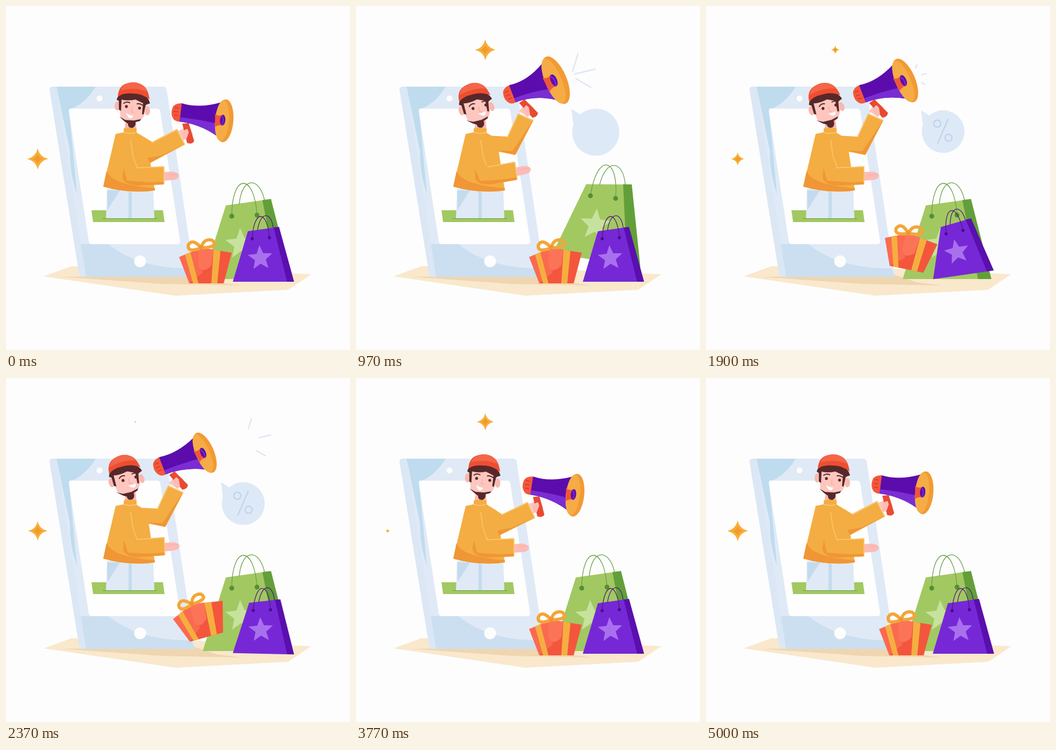
Animation of 640 by 640 pixels, one loop 5030 ms. Source, as an HTML page:

```html
<!DOCTYPE html>
<html lang="en">
<head>
<meta charset="utf-8">
<title>Shopping announcement</title>
<style>
html, body { margin: 0; width: 100%; height: 100%; overflow: hidden; background: #fdfdfd; }
svg { display: block; width: 100vw; height: 100vh; }
.line { fill: none; stroke-linecap: round; }
</style>
</head>
<body>
<svg viewBox="0 0 640 640">
  <defs>
    <g id="spark">
      <path d="M0-20Q3-4 20 0Q4 3 0 20Q-3 4-20 0Q-4-3 0-20Z" fill="#f8ae38"/>
      <path d="M0-10Q2-2 10 0Q2 2 0 10Q-2 2-10 0Q-2-2 0-10Z" fill="#f09a30"/>
    </g>
    <clipPath id="phoneClip"><path d="M88 150H292Q298 150 299 156L351 504H145Q137 504 136 498L81 157Q80 150 88 150Z"/></clipPath>
  </defs>

  <path d="M70 503L122 484L330 488L568 499L525 528L315 539Z" fill="#f9e8cc"/>
  <path d="M104 504L350 500L392 514L440 520L290 517Z" fill="#efd5b0"/>

  <!-- phone -->
  <g clip-path="url(#phoneClip)">
    <path d="M75 145H360V510H75Z" fill="#e0eaf6"/>
    <path d="M94 150H167Q150 178 125 190L117 191L132 350Q118 310 119 270Z" fill="#bfdcef"/>
    <path d="M133 443H190Q250 490 345 488L352 504H148Z" fill="#cbdff0"/>
    <path d="M81 150H94L149 504H136Z" fill="#dbe7f4"/>
  </g>
  <path d="M122 191H281Q286 191 287 196L324 438Q324 443 319 443H160Q155 443 154 438L117 196Q117 191 122 191Z" fill="#fefefe"/>
  <circle cx="174" cy="172" r="5.5" fill="#fdfdfd"/>
  <circle cx="249.500" cy="475" r="11" fill="#fdfdfd"/>

  <!-- body -->
  <path d="M159 380H292L295 402H162Z" fill="#a2c862"/>
  <path d="M188 340H274L276 395H186Z" fill="#dfeaf6"/>
  <path d="M188 343H212L189 379ZM228 346H234V395H228Z" fill="#c4dbed"/>
  <path d="M180 395.500H281" stroke="#659c3c"/>
  <path d="M223 211H241L243 232H220Z" fill="#f9b8ae"/>
  <path d="M204 238L219 235V228Q231 224 243 228V236L262 247L270 300L277 343Q229 350 181 336Z" fill="#f4ad42"/>
  <path d="M187 307Q197 333 277 339V343Q229 350 181 336Z" fill="#f09636"/>
  <path d="M219 235Q231 239 243 235" class="line" stroke="#f9cb7c" stroke-width="1.500"/>
  <path d="M232 250L236 278L244 301" class="line" stroke="#f8c266" stroke-width="2"/>

  <g id="forearm">
    <path d="M294 309L310 308Q321 310 322 316Q320 324 308 324L293 325Z" fill="#fcbcb6"/>
    <path d="M302 314L319 313" stroke="#f8a8a4"/>
    <path d="M222 272L243 301L294 298V332L242 334Q218 332 218 318Z" fill="#f4ad42"/>
    <path d="M219 301L225 325L266 328L293 327V332L242 334Q217 331 217 317Z" fill="#f09636"/>
    <path d="M243 301L294 299V331" class="line" stroke="#f9cb7c" stroke-width="1.500"/>
  </g>

  <g id="head">
    <ellipse cx="207" cy="186" rx="5" ry="8.500" fill="#f9b8ae"/>
    <ellipse cx="263" cy="195" rx="5" ry="8.500" fill="#f9b8ae"/>
    <path d="M211 206L223 211L254 207L249 214L241 216Q242 224 235 227Q226 226 227 219L221 215Z" fill="#57282a"/>
    <path d="M210 170L264 176L257 204L253 210L238 213L222 212L213 207Z" fill="#fdc6be"/>
    <path d="M206 174Q209 160 237 160Q263 162 268 181L260 184L256 202L253 201L255 181Q247 177 241 174Q226 177 215 174L214 195L210 193V177Z" fill="#57282a"/>
    <g id="face">
      <circle cx="224" cy="187" r="2.700" fill="#57282a"/>
      <circle cx="248.500" cy="190" r="2.700" fill="#57282a"/>
      <path d="M219 181Q224 177 230 180M244 182Q249 181 255 185" class="line" stroke="#57282a" stroke-width="2"/>
      <path d="M235 188L233 197L238 198" class="line" stroke="#f6a298"/>
    </g>
    <path id="mouth" d="M224 199Q230 204 237 204Q235 210 230 209Q225 206 224 199Z" fill="#fefefe"/>
    <path d="M208 169Q209 142 238 142Q264 144 267 174Q253 163 237 163Q218 161 208 169Z" fill="#ee4e30"/>
    <path d="M213 157Q219 142 238 142Q258 144 264 160Q240 150 213 157Z" fill="#f4664a"/>
  </g>

  <polygon id="arm" fill="#f4ad42" stroke="#f4ad42" stroke-width="2" stroke-linejoin="round"/>
  <polygon id="armShade" fill="#f09636"/>
  <polyline id="armEdge" class="line" stroke="#f9cb7c" stroke-width="1.500"/>

  <g id="horn">
    <path d="M320 232Q329 230 335 224L342 226L348 239L342 246L330 249Z" fill="#fdc6be"/>
    <path d="M328 219L340 218L350 251Q349 255 343 256L337 255Z" fill="#e94a32"/>
    <path d="M328 234Q333 229 338 229L340 235L336 247L329 249Z" fill="#fcbcb6"/>
    <path d="M327 181Q313 181 310 189Q305 202 312 211Q317 216 326 215Z" fill="#f4573c"/>
    <path d="M314 189L321 190M312 196L320 197M313 203L320 204" stroke="#c9382c" stroke-width="1.500"/>
    <path id="cone" fill="#5c0cac"/>
    <path id="coneShade" fill="#7a2dd2"/>
    <g id="bell">
      <ellipse cx="1" rx="17" ry="40" fill="#f29a34"/>
      <ellipse cx="-3" rx="13" ry="38" fill="#f6ac46"/>
      <path d="M-17-12Q-11-6-3-11V9Q-10 8-15 13Z" fill="#ef5638"/>
      <ellipse cx="-2" cy="-1" rx="5" ry="10" fill="#5c0cac"/>
      <path d="M-4-8Q1-3-2 8" class="line" stroke="#7a2dd2" stroke-width="2"/>
    </g>
  </g>
  <g id="rays" stroke="#dce7f5" stroke-width="2.500" stroke-linecap="round"><line/><line/><line/></g>

  <g id="bubble">
    <circle cx="441" cy="233.500" r="39.500" fill="#dee9f7"/>
    <path d="M400 194L423 209L404 225Z" fill="#dee9f7"/>
    <g id="percent" class="line" stroke="#bfd3ea" stroke-width="2.200">
      <circle cx="430" cy="219" r="6.500"/><circle cx="451" cy="245" r="6.500"/><path d="M450 211L431 255"/>
    </g>
  </g>

  <!-- bags and gift -->
  <g id="green">
    <path d="M409 371L480 361L508 508H366Z" fill="#a2c862"/>
    <path d="M477 361L493 359L531 508H506Z" fill="#629f3a"/>
    <polygon class="star" transform="translate(437 443) rotate(-3) scale(1.25)" fill="#c6e29c"/>
    <path d="M420 391C420 310 462 310 467 389M434 368C439 317 471 317 481 361" class="line" stroke="#6b9f48" stroke-width="1.300"/>
    <path d="M420 391h.01M467 389h.01" class="line" stroke="#558f34" stroke-width="9"/>
  </g>
  <g id="purple">
    <path d="M450 419L501 412L525 513H422Z" fill="#7628d6"/>
    <path d="M498 412L508 411L536 513H523Z" fill="#5a0fae"/>
    <polygon class="star" transform="translate(473 469) rotate(-4)" fill="#a970ee"/>
    <path d="M458 433C461 378 486 378 490 431M468 417C473 382 493 382 497 412" class="line" stroke="#53187e" stroke-width="1.300"/>
    <path d="M458 433h.01M490 431h.01" class="line" stroke="#4b0c92" stroke-width="6"/>
  </g>
  <g id="gift">
    <path d="M322 467L363 450L372 516H341Z" fill="#fa6a50"/>
    <path d="M363 450L420 459L405 516H341L366 496Z" fill="#f3563c"/>
    <path d="M358 452L363 450L386 453L382 483Q366 499 358 484Z" fill="#fb7458"/>
    <path d="M333 462L343 458L358 516H348ZM386 453L399 456L393 516H382Z" fill="#f6ae40"/>
    <path d="M363 450Q337 460 339 445Q347 431 363 450ZM363 450Q368 431 384 436Q397 449 363 450Z" class="line" stroke="#f3a638" stroke-width="6" stroke-linejoin="round"/>
    <circle cx="363" cy="449" r="4" fill="#ee9532"/>
  </g>
  <use id="sparkLeft" href="#spark"/>
  <use id="sparkTop" href="#spark"/>
</svg>
<script>
const LOOP = 5030, BEAT = 1010, FIRST_BEAT = 970;
const $ = id => document.getElementById(id);
const set = (id, name, value) => $(id).setAttribute(name, value);
const move = (id, value) => set(id, 'transform', value);
const clamp = v => Math.max(0, Math.min(1, v));
const mix = (a, b, k) => a + (b - a) * k;
const scaleAt = (x, y, s) => `translate(${x} ${y}) scale(${s}) translate(${-x} ${-y})`;

// Smooth interpolation through [time, value] pairs.
function track(t, keys) {
  const i = keys.findIndex(k => k[0] > t);
  if (i < 0) return keys[keys.length - 1][1];
  if (!i) return keys[0][1];
  const [t0, a] = keys[i - 1], [t1, b] = keys[i], u = (t - t0) / (t1 - t0);
  return mix(a, b, u * u * (3 - 2 * u));
}

const POSE = [[0, 0], [250, 0], [780, 1.04], [900, 1], [3230, 1], [3720, -.07], [3770, -.06], [3920, 0]];
const GESTURE = [[0, 0], [150, 0], [650, -16], [970, -7.5], [1430, -3.8], [1850, 0], [2220, 0],
  [2370, -2], [2900, -17], [3030, -16], [3550, 0]];
const BUBBLE = [[650, 0], [920, 1.14], [970, 1.11], [1200, .97], [1430, 1], [2370, 1.01], [2560, 1.05], [2850, 0]];
const PERCENT = [[1390, 0], [1430, .15], [1750, 1.1], [1900, 1]];

const ARM = [
  [[242, 236], [272, 254], [318, 230], [332, 257], [268, 291], [258, 268]],
  [[242, 242], [282, 244], [302, 201], [329, 213], [296, 276], [255, 268]]
];
const ARM_SHADE = [
  [[333, 256], [268, 292], [263, 283], [290, 278]],
  [[330, 212], [296, 277], [262, 269], [291, 270]]
];
const RAYS = [
  { at: [408, 105], go: [48, -21], dir: [5, -16] },
  { at: [426, 122], go: [58, -14], dir: [19, -4.5] },
  { at: [423, 143], go: [54, -3], dir: [14, 8] }
];
const HOPS = [
  { id: 'green', x: 446, y: 500, start: 600, heights: [38, 9, 0], turns: [9, -9, 0] },
  { id: 'purple', x: 479, y: 513, start: 1080, heights: [29, 14, 0], turns: [19, -9, 3] },
  { id: 'gift', x: 373, y: 516, start: 1470, heights: [34, 34, -2], turns: [15, -15.5, 1] }
];

const starPoints = Array.from({ length: 10 }, (_, i) => {
  const r = i % 2 ? 10.5 : 24, a = i * Math.PI / 5;
  return [r * Math.sin(a), -r * Math.cos(a)];
}).join(' ');
document.querySelectorAll('.star').forEach(s => s.setAttribute('points', starPoints));

const morph = ([a, b], k) => a.map((p, i) => p.map((v, j) => mix(v, b[i][j], k)));

function drawPerson(t) {
  const k = track(t, POSE), lift = track(t, GESTURE);
  move('head', `rotate(${-17 * k} 232 227)`);
  move('face', `translate(${5 * k} 0) rotate(${-5 * k} 236 188)`);
  move('mouth', `translate(${13 * k} ${-2 * k}) rotate(${-22 * k} 230 204)`);
  const arm = morph(ARM, k);
  set('arm', 'points', arm.join(' '));
  set('armShade', 'points', morph(ARM_SHADE, k).join(' '));
  set('armEdge', 'points', arm.slice(1, 4).join(' '));
  move('forearm', `translate(${-.75 * lift} 0) rotate(${lift} 228 325)`);
  move('horn', `translate(${-33 * k} ${-31 * k}) rotate(${-28 * k} 317 198)`);
}

function drawSound(t) {
  const active = t > 820 && t < 3650;
  const beat = ((t - FIRST_BEAT) / BEAT + 1.15) % 1 - .15;
  const pulse = active ? track(beat, [[-.15, 0], [0, 1], [.05, .96], [.36, 0]]) : 0;
  const grow = 5 * pulse;
  const top = 179 - grow, low = 241 + grow;
  set('cone', 'd', `M327 181Q360 191 401 ${top}L391 ${low}Q361 220 323 215Z`);
  set('coneShade', 'd', `M324 207Q360 211 393 ${low - 22}L391 ${low}Q361 220 323 215Z`);
  move('bell', `translate(${405 + 2 * pulse} 213.5) rotate(5) scale(${1 + .18 * pulse})`);

  const p = 1 - (1 - clamp((beat + .1) / .6)) ** 2;
  const travel = (p - .31) / .685;
  const size = active ? clamp(Math.min((beat + .1) / .1, (.59 - beat) / .36)) : 0;
  set('rays', 'opacity', size > 0 ? 1 : 0);
  RAYS.forEach(({ at, go, dir }, i) => {
    const line = $('rays').children[i];
    ['x', 'y'].forEach((axis, j) => {
      const c = at[j] + go[j] * travel;
      line.setAttribute(axis + 1, c - dir[j] * size);
      line.setAttribute(axis + 2, c + dir[j] * size);
    });
  });
}

function drawHops(t) {
  for (const { id, x, y, start, heights, turns } of HOPS) {
    const u = (t - start) / 600, n = Math.floor(u);
    const s = n >= 0 && n < 3 ? Math.sin((u - n) * Math.PI) : 0;
    const rise = s ? heights[n] * s : 0, turn = s ? turns[n] * s : 0;
    move(id, `translate(0 ${-rise}) rotate(${turn} ${x} ${y})`);
  }
}

function drawSparks(t) {
  const u = t % (LOOP / 2);
  const k = clamp(Math.min(u / 720, (LOOP / 2 - u) / 1575));
  move('sparkLeft', `translate(59 284.500) scale(${1 - k})`);
  move('sparkTop', `translate(240.500 81.500) scale(${k})`);
}

function frame(now) {
  const t = now % LOOP;
  drawPerson(t);
  drawSound(t);
  drawHops(t);
  drawSparks(t);
  move('bubble', scaleAt(395, 222, track(t, BUBBLE)));
  move('percent', scaleAt(441, 233, track(t, PERCENT)));
  requestAnimationFrame(frame);
}
frame(0);
</script>
</body>
</html>
```
